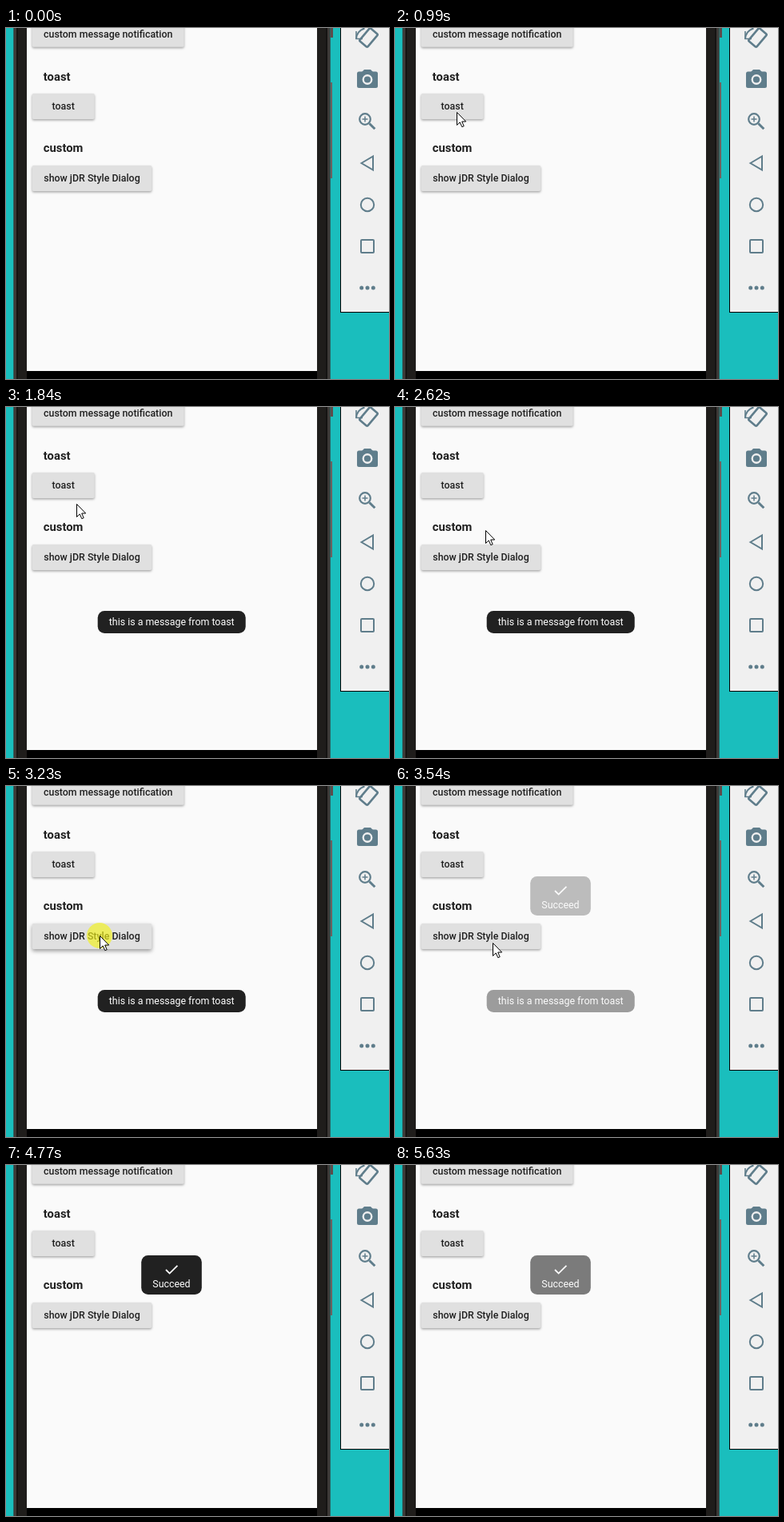
Write an HTML page with a canvas that moves like this. It is 479 px wide and 439 px high and loops after 5700 ms.

```html
<!DOCTYPE html>
<html lang="en">
<head>
<meta charset="utf-8">
<title>Toast demo</title>
<style>
  html, body { margin: 0; width: 100%; height: 100%; overflow: hidden; background: #1abebd; }
  canvas { display: block; }
</style>
</head>
<body>
<canvas id="stage" width="479" height="439"></canvas>
<script>
const ctx = document.getElementById('stage').getContext('2d');
const LOOP = 5700;
const ICON = '#5f7d8b';
const PAGE = 250;

// Pointer moves: first step at, last step at, number of steps, x, y
const START = [356, 434];
const MOVES = [
  [70, 210, 3, 282, 307],
  [380, 530, 3, 186, 169],
  [760, 990, 4, 77, 105],
  [1765, 1990, 4, 99, 137],
  [2080, 2140, 2, 106, 142],
  [2310, 2390, 2, 111, 143],
  [2620, 2845, 4, 117, 187],
  [3540, 3770, 4, 136, 221],
  [3850, 3920, 2, 179, 276],
  [4230, 4390, 3, 290, 375],
  [4690, 4690, 1, 378, 418]
];

const within = (t, a, b) => t >= a && t < b;

// Share of a stepped change that is done at time t
function stepped(t, first, last, count) {
  if (t < first) return 0;
  if (t >= last) return 1;
  const gap = (last - first) / (count - 1);
  return (Math.floor((t - first) / gap + 0.001) + 1) / count;
}

function pointerAt(t) {
  let [x, y] = START;
  for (const [first, last, count, nx, ny] of MOVES) {
    const p = stepped(t, first, last, count);
    if (!p) break;
    x += (nx - x) * p;
    y += (ny - y) * p;
  }
  return [Math.round(x), Math.round(y)];
}

function rect(x, y, w, h, color) {
  ctx.fillStyle = color;
  ctx.fillRect(x, y, w, h);
}

function roundRect(x, y, w, h, r, color) {
  ctx.beginPath();
  ctx.roundRect(x, y, w, h, r);
  ctx.fillStyle = color;
  ctx.fill();
}

function text(str, x, y, weight, size, color) {
  ctx.font = `${weight} ${size}px Roboto, sans-serif`;
  ctx.fillStyle = color;
  ctx.fillText(str, x, y);
}

function line(points, close) {
  ctx.beginPath();
  points.forEach(([x, y]) => ctx.lineTo(x, y));
  if (close) ctx.closePath();
}

function circle(x, y, r) {
  ctx.beginPath();
  ctx.arc(x, y, r, 0, Math.PI * 2);
}

function button(label, y, w, pressed) {
  ctx.save();
  ctx.shadowColor = pressed ? 'rgba(0,0,0,.38)' : 'rgba(0,0,0,.34)';
  ctx.shadowBlur = pressed ? 5 : 3;
  ctx.shadowOffsetY = pressed ? 2.5 : 1.5;
  roundRect(32.7, y, w, 32, 1.8, '#e0e0e0');
  ctx.restore();
  ctx.textAlign = 'center';
  text(label, 32.7 + w / 2, y + 20.2, 500, 12.4, '#202020');
  ctx.textAlign = 'left';
}

function phone() {
  rect(0, 0, 479, 439, '#1abebd');
  rect(9, 0, 397, 439, '#3d3a38');
  rect(9, 0, 1, 439, '#2b6462');
  rect(13, 0, 389, 439, '#1f1d1b');
  rect(13, 0, 2, 439, '#151312');
  rect(400, 0, 2, 439, '#151312');
  rect(405, 0, 1, 439, '#2b6462');
  rect(406, 0, 3, 12, '#5d4c4b');
  rect(406, 68, 2, 120, '#6d6260');
  rect(26, 0, 363, 429, '#fafafa');
  rect(26, 429, 363, 10, '#000');
}

function rotateIcon() {
  ctx.save();
  ctx.translate(453.5, 12);
  ctx.rotate(0.7);
  ctx.lineWidth = 2.6;
  ctx.beginPath();
  ctx.roundRect(-6.5, -10.5, 13, 21, 1.5);
  ctx.stroke();
  ctx.restore();
  ctx.lineWidth = 2;
  ctx.beginPath();
  ctx.arc(452, 14, 14, Math.PI, Math.PI * 1.42);
  ctx.stroke();
  line([[438, 4], [438, 13.5], [446, 13.5]]);
  ctx.lineWidth = 1.6;
  ctx.stroke();
}

function cameraIcon() {
  roundRect(439, 54.5, 26, 20.5, 2.5, ICON);
  line([[445, 55], [448, 52], [456, 52], [459, 55]], true);
  ctx.fill();
  circle(452, 64.5, 6.4);
  ctx.fillStyle = '#f0f0f0';
  ctx.fill();
  circle(452, 64.5, 4.1);
  ctx.fillStyle = ICON;
  ctx.fill();
}

function zoomIcon() {
  ctx.lineWidth = 2.2;
  circle(449, 114, 6.8);
  ctx.stroke();
  ctx.lineWidth = 1.5;
  line([[445.5, 114], [452.5, 114]]);
  ctx.stroke();
  line([[449, 110.5], [449, 117.5]]);
  ctx.stroke();
  ctx.lineWidth = 3;
  line([[454.5, 119.5], [461.3, 126.3]]);
  ctx.stroke();
}

function toolbar() {
  rect(418, 0, 61, 356, '#000');
  rect(419, 0, 60, 355, '#f0f0f0');
  ctx.strokeStyle = ICON;
  rotateIcon();
  cameraIcon();
  zoomIcon();
  ctx.lineWidth = 2;
  line([[444.5, 169], [459, 160.5], [459, 177.5]], true);
  ctx.stroke();
  circle(452, 221, 8.2);
  ctx.stroke();
  ctx.beginPath();
  ctx.roundRect(444, 265, 16, 16, 1);
  ctx.stroke();
  ctx.fillStyle = ICON;
  for (const x of [444.7, 452, 459.3]) {
    circle(x, 325, 2.5);
    ctx.fill();
  }
}

function page(t) {
  button('custom message notification', -8.2, 190, false);
  text('toast', 46.8, 65.6, 700, 14.8, '#202020');
  button('toast', 82, 78, within(t, 1300, 1530));
  text('custom', 46.8, 155.4, 700, 14.8, '#202020');
  button('show jDR Style Dialog', 172, 149.5, within(t, 3230, 3390));
}

// Dark panel faded as one group; returns the ink colour
function panel(x, y, w, h, alpha) {
  roundRect(x, y, w, h, 8.5, `rgba(33,33,33,${alpha})`);
  const v = Math.round(PAGE + 5 * alpha);
  return `rgb(${v},${v},${v})`;
}

function toast(t) {
  const alpha = stepped(t, 1450, 1840, 6) * (1 - 0.99 * stepped(t, 3310, 3770, 7));
  if (!alpha || t >= 3850) return;
  const ink = panel(114.7, 255, 185, 28, alpha);
  text('this is a message from toast', 128.8, 273.2, 400, 12.4, ink);
}

function popup(t) {
  let alpha = stepped(t, 3390, 3850, 7);
  if (t >= 3770 && t < 3850) alpha = 0.84;
  if (t >= 5550) alpha = t < 5630 ? 0.82 : 0.58;
  if (!alpha) return;
  const ink = panel(169.2, 113, 75.6, 49, alpha);
  line([[200, 131], [204.6, 135.6], [214.4, 125.8]]);
  ctx.strokeStyle = ink;
  ctx.lineWidth = 1.8;
  ctx.stroke();
  text('Succeed', 183.3, 152.7, 400, 12.4, ink);
}

function pointer(t) {
  if (!within(t, 70, 4770)) return;
  const [x, y] = pointerAt(t);
  if (within(t, 1070, 1300) || within(t, 2920, 3310)) {
    circle(x, y, 16);
    ctx.fillStyle = 'rgba(243,243,25,.65)';
    ctx.fill();
  }
  ctx.save();
  ctx.translate(x + 0.5, y + 0.5);
  line([[0, 0], [0, 16], [3.7, 12.4], [6.3, 18.2], [8.7, 17.2], [6.2, 11.5], [11.2, 11.5]], true);
  ctx.fillStyle = '#fff';
  ctx.fill();
  ctx.strokeStyle = '#000';
  ctx.lineWidth = 1;
  ctx.stroke();
  ctx.restore();
}

function draw(t) {
  phone();
  page(t);
  toast(t);
  popup(t);
  toolbar();
  pointer(t);
}

const begin = performance.now();
function tick() {
  draw((performance.now() - begin) % LOOP);
  requestAnimationFrame(tick);
}
tick();
</script>
</body>
</html>
```
